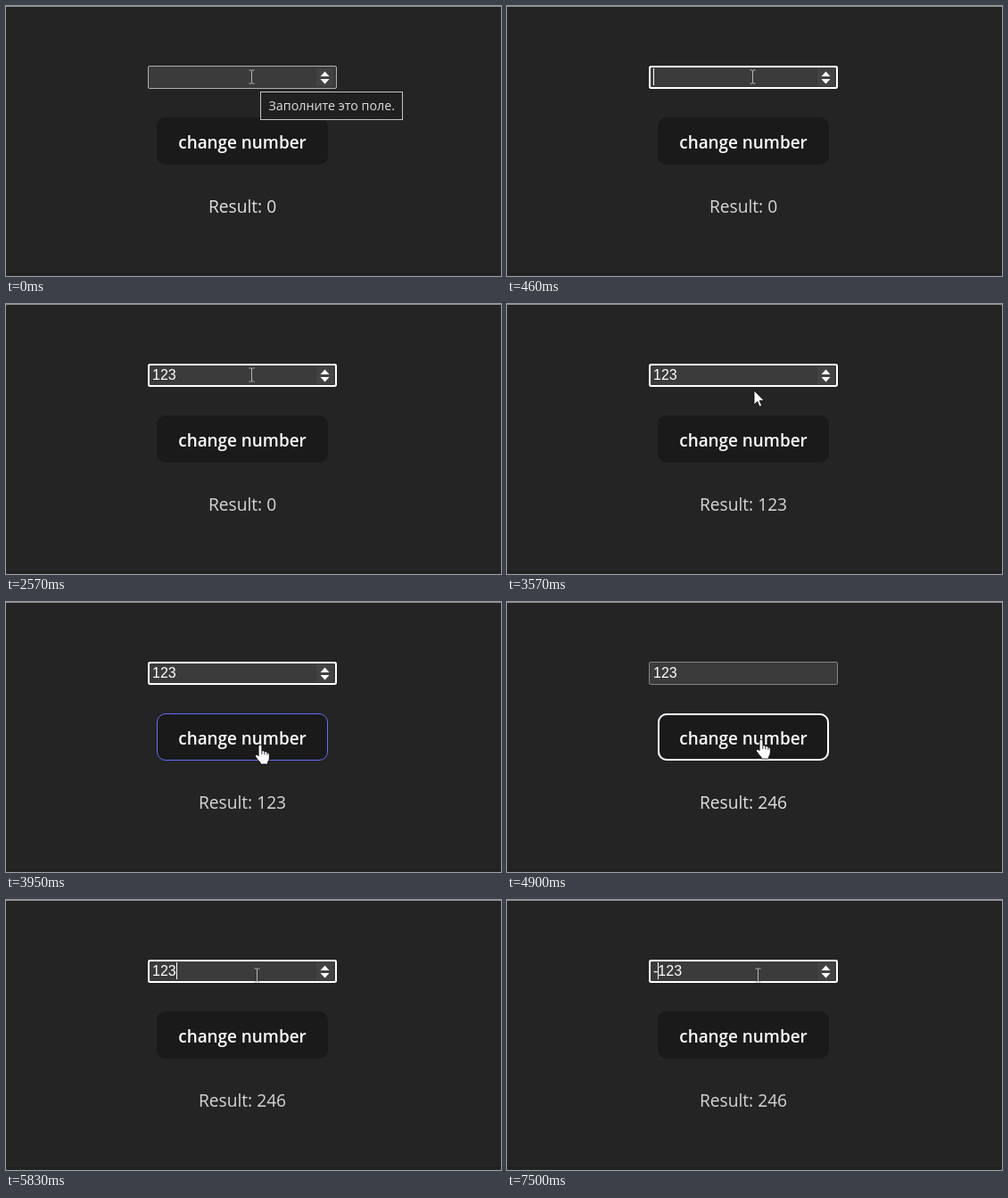
Recreate the animation shown at these times as an HTML page. Size 555 by 303 pixels, loop 8 s.

```html
<!DOCTYPE html>
<html lang="en">
<head>
<meta charset="utf-8">
<title>Change number</title>
<style>
  html, body { margin: 0; width: 100%; height: 100%; overflow: hidden; background: #242424; }
  svg { display: block; width: 100vw; height: 100vh; }
  text { font-family: "Open Sans", "Noto Sans", sans-serif; }
  #value { font: 16px "Liberation Sans", Arial, sans-serif; }
</style>
</head>
<body>
<svg viewBox="0 0 555 303">
  <rect width="555" height="303" fill="#242424"/>
  <rect width="555" height="1" fill="#8c8c8c"/>
  <rect y="300" width="555" height="1" fill="#1e1c1c"/>

  <rect id="field" x="159.5" y="67.5" width="211" height="25" rx="1.5" fill="#3b3b3b"/>
  <g id="spinner">
    <rect x="348" y="70" width="19" height="20" fill="#424242"/>
    <path d="M352.5 79l5-5.5 5 5.5zM352.5 82l5 5.5 5-5.5z" fill="#fff"/>
  </g>
  <rect id="fieldRing" x="160" y="68" width="210" height="24" rx="2" fill="none" stroke="#fff" stroke-width="2"/>
  <text id="value" x="164" y="85" fill="#fff"></text>
  <rect id="caret" y="70" width="1" height="19" fill="#fff"/>

  <rect x="169" y="125" width="192" height="53" rx="10" fill="#1a1a1a"/>
  <rect id="hover" x="169.5" y="125.5" width="191" height="52" rx="9.5" fill="none" stroke="#646cff"/>
  <rect id="buttonRing" x="170" y="126" width="190" height="51" rx="9" fill="none" stroke="#fff" stroke-width="2"/>
  <text x="265" y="160" font-size="18.9" font-weight="600" text-anchor="middle" fill="#fff">change number</text>
  <text id="result" x="265" y="232" font-size="19.2" text-anchor="middle"></text>

  <g id="tooltip">
    <rect x="285.5" y="96.5" width="159" height="31" fill="#202020" stroke="#c4c4c4"/>
    <text x="294.5" y="117" font-size="14.3" fill="#dcdcdc">Заполните это поле.</text>
  </g>

  <g id="pointer">
    <path id="beam" d="M-3 -7.5h2.5l.5 .5 .5 -.5h2.5M0 -7V7M-3 7.5h2.5l.5 -.5 .5 .5h2.5" fill="none" stroke="#b4b4b4"/>
    <path id="arrow" d="M0 0V16l3.7-3.5 2.4 5.7 2.6-1.1-2.4-5.5h5z" fill="#fff" stroke="#000" stroke-width=".8"/>
    <g id="hand" stroke="#000" stroke-width=".8">
      <path d="M-1.9 2a1.9 1.9 0 0 1 3.8 0V7q2.2-.6 3 .9 2.3-.6 3 1 2.4-.2 2.4 2.1V15q0 2.6-1.7 4.6V22H.2V20.2Q-2.2 18-5.2 13.8c-.9-1.8 1.2-3.2 2.4-2l.9 1z" fill="#fff"/>
      <path d="M1.9 7v4M4.9 8v3.4M7.9 9v2.8" fill="none"/>
    </g>
  </g>
</svg>
<script>
const LOOP = 8000;
const el = id => document.getElementById(id);
const show = (id, on) => el(id).setAttribute("opacity", +on);
const move = (cursor, x, y) => ({ cursor, x, y });

// Each step keeps whatever it does not change.
const steps = [
  [0, { focus: "", over: true, tip: true, value: "", caret: 0, result: 0, hover: 0, ...move("beam", 275.5, 79.5) }],
  [460, { focus: "field", tip: false, caret: 164 }],
  [990, { caret: 0 }],
  [1240, { value: "1", caret: 173 }],
  [1490, { value: "12", caret: 182 }],
  [2030, { value: "123", caret: 191 }],
  [2570, { caret: 0 }],
  [2860, { result: 123 }],
  [3140, { caret: 191 }],
  [3570, { caret: 0, over: false, ...move("arrow", 277, 97) }],
  [3697, { hover: .4, ...move("hand", 281, 131) }],
  [3823, { hover: .8, ...move("hand", 284, 152) }],
  [3950, { hover: 1, ...move("hand", 285, 160) }],
  [4100, { caret: 191, y: 157 }],
  [4220, { y: 154 }],
  [4600, { caret: 0 }],
  [4900, { focus: "button", result: 246 }],
  [5270, move("hand", 284, 134)],
  [5395, { hover: 0, ...move("arrow", 282, 100) }],
  [5520, { over: true, ...move("beam", 281.5, 84.5) }],
  [5830, { focus: "field", caret: 191 }],
  [6360, { caret: 0 }],
  [6810, { caret: 164 }],
  [7380, { caret: 0 }],
  [7500, { value: "-123", caret: 169 }]
];

function stateAt(time) {
  const past = steps.filter(([start]) => start <= time);
  return Object.assign({}, ...past.map(([, change]) => change));
}

function draw(time) {
  const s = stateAt(time);
  const focused = s.focus === "field";
  el("value").textContent = s.value;
  el("result").textContent = "Result: " + s.result;
  el("result").setAttribute("fill", focused ? "#d6d6d6" : "#e0e0e0");
  el("field").setAttribute("stroke", s.over ? "#b0b0b0" : "#858585");
  el("caret").setAttribute("x", s.caret);
  el("pointer").setAttribute("transform", `translate(${s.x} ${s.y})`);
  show("caret", s.caret > 0);
  show("spinner", focused || s.over);
  show("fieldRing", focused);
  show("buttonRing", s.focus === "button");
  show("hover", s.hover);
  show("tooltip", s.tip);
  for (const id of ["beam", "arrow", "hand"]) show(id, id === s.cursor);
}

const begin = performance.now();
function tick() {
  draw((performance.now() - begin) % LOOP);
  requestAnimationFrame(tick);
}
tick();
</script>
</body>
</html>
```
